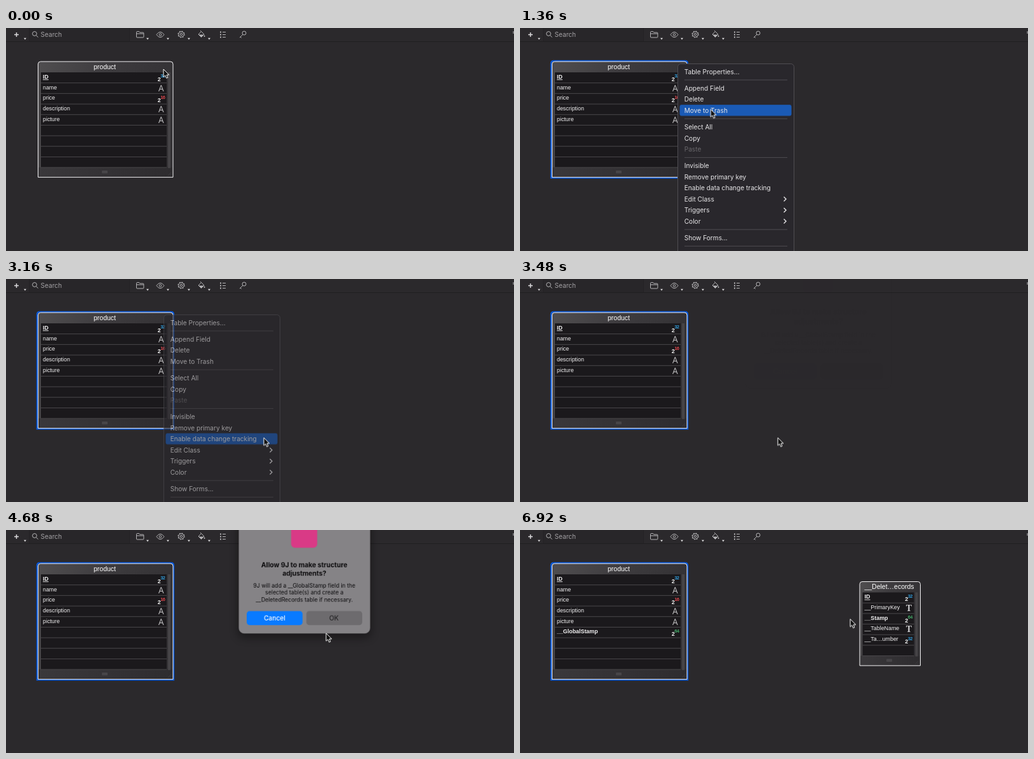
An HTML page for the animation above (8 s loop, 800 by 352 pixels).

```html
<!DOCTYPE html>
<html lang="en">
<head>
<meta charset="utf-8">
<title>Table structure editor</title>
<style>
  html, body { margin: 0; width: 100%; height: 100%; overflow: hidden; background: #2b292c; }
  svg { display: block; width: 800px; height: 352px; }
  text { white-space: pre; }
  .ui { font: 10.15px Inter, sans-serif; fill: #e8e7e9; }
  .mid { text-anchor: middle; }
  .head { font: 10.5px "Liberation Sans", Arial, sans-serif; fill: #fff; text-anchor: middle; }
  .field { font: 8.9px "Liberation Sans", Arial, sans-serif; fill: #f2f1f2; }
  .bold { font-weight: 700; }
  .two { font: 700 9px "Liberation Sans", Arial, sans-serif; fill: #eee; }
  .sup { font: 700 7.5px "Liberation Sans", Arial, sans-serif; letter-spacing: -.6px; }
  .alpha { font: 13.6px "Open Sans", sans-serif; fill: #bdbcbe; text-anchor: middle; }
  .serif { font: 700 14px "Liberation Serif", Times, serif; fill: #d4d3d5; text-anchor: middle; }
  .icon { fill: none; stroke: #b5b4b6; stroke-width: 1; }
  .ask { font: 700 10.4px Inter, sans-serif; fill: #0d0c0e; }
  .note { font: 8.78px Inter, sans-serif; fill: #0d0c0e; }

  .anim { animation: 8s linear infinite; }
  #cursor { animation-name: move; }
  #select { animation-name: select; animation-timing-function: step-end; }
  #menu { animation-name: menu; }
  #bar { animation-name: bar; animation-timing-function: step-end; }
  #dialog { animation-name: dialog; transform-origin: 469.8px 82px; }
  .added { animation-name: added; animation-timing-function: step-end; }

  @keyframes move {
    0%, .5% { transform: translate(248px, 65px); }
    2% { transform: translate(248px, 59px); }
    4%, 11% { transform: translate(247px, 55px); }
    14% { transform: translate(276px, 95px); }
    17% { transform: translate(300px, 128px); }
    19% { transform: translate(335px, 165px); }
    21% { transform: translate(385px, 220px); }
    22.5% { transform: translate(406px, 248px); }
    27.5%, 54.5% { transform: translate(406px, 250.5px); }
    56.5% { transform: translate(455px, 203px); }
    58.5% { transform: translate(504px, 163px); }
    60.5% { transform: translate(517px, 147px); }
    62.5%, 100% { transform: translate(520px, 140.5px); }
  }
  @keyframes select { 0% { opacity: 0; } 7.5%, 100% { opacity: 1; } }
  @keyframes menu {
    0%, 7.99% { opacity: 0; }
    8%, 37.5% { opacity: 1; }
    39.5% { opacity: .6; }
    42%, 100% { opacity: 0; }
  }
  @keyframes bar {
    0% { opacity: 0; transform: translateY(60.2px); }
    11.5% { opacity: 1; transform: translateY(60.2px); }
    13% { opacity: 0; transform: translateY(60.2px); }
    13.5% { opacity: 1; transform: translateY(86.2px); }
    14.8% { opacity: 1; transform: translateY(103.7px); }
    16.3% { opacity: 1; transform: translateY(121.2px); }
    17.5% { opacity: 0; transform: translateY(121.2px); }
    18% { opacity: 1; transform: translateY(147.2px); }
    19% { opacity: 1; transform: translateY(164.7px); }
    19.6% { opacity: 0; transform: translateY(164.7px); }
    20.6% { opacity: 1; transform: translateY(208.5px); }
    21.4% { opacity: 1; transform: translateY(226px); }
    22.3% { opacity: 1; transform: translateY(243.5px); }
    35.5% { opacity: 0; transform: translateY(243.5px); }
    36.5%, 100% { opacity: 1; transform: translateY(243.5px); }
  }
  @keyframes dialog {
    0%, 43.5% { opacity: 0; transform: scale(1.12); }
    45% { opacity: .87; transform: scale(1.053); }
    46% { opacity: 1; transform: scale(1.02); }
    47.5%, 83.5% { opacity: 1; transform: none; }
    85.5%, 100% { opacity: 0; transform: none; }
  }
  @keyframes added { 0% { opacity: 0; } 85%, 100% { opacity: 1; } }
</style>
</head>
<body>
<svg viewBox="0 0 800 352">
  <defs>
    <linearGradient id="shell" x2="1" y2=".3">
      <stop offset="0" stop-color="#504e50"/><stop offset=".5" stop-color="#3d3b3e"/><stop offset="1" stop-color="#333134"/>
    </linearGradient>
    <linearGradient id="foot" x2="1">
      <stop offset="0" stop-color="#3a383b"/><stop offset="1" stop-color="#2e2c2f"/>
    </linearGradient>
    <filter id="soft" x="-20%" y="-20%" width="140%" height="140%"><feGaussianBlur stdDeviation="7"/></filter>
  </defs>

  <rect width="800" height="352" fill="#2b292c"/>

  <g id="toolbar">
    <rect x="36" width="158" height="21" fill="#282629"/>
    <path d="M0 21.5H800" stroke="#201f21"/>
    <path d="M36.5 0V21M194.5 0V21" stroke="#242225"/>
    <path d="M16.5 7v7M13 10.5h7" stroke="#dddcde" stroke-width="1.5"/>
    <g class="icon">
      <circle cx="45" cy="9" r="3.4"/><path d="M47.5 11.5L50.5 14.7"/>
      <path d="M205.5 14V6.5q0-1 1-1h3l1.4 1.6h5q1 0 1 1V14q0 1-1 1h-9.4q-1 0-1-1zM205.5 9h11.4"/>
      <path d="M237 10.5q6-8.5 12 0q-6 8.5-12 0z"/><circle cx="243" cy="10.5" r="1.8"/>
      <circle cx="276" cy="10" r="4.2"/><circle cx="276" cy="10" r="1.7"/>
      <circle cx="276" cy="10" r="5" stroke-dasharray="1.9 2.03" stroke-width="1.2"/>
      <path d="M303 10l4.5-4.5 4.5 4.5-4.5 4.5zM306 4l2 2"/>
      <path d="M337 6.5h2M337 10.5h2M337 14.500h2" stroke-width="1.8"/>
      <path d="M341 6.500h5M341 10.500h5M341 14.500h5"/>
      <circle cx="375" cy="8" r="3"/><path d="M373 10.200l-5 5M369 14l1.700 1.700"/>
    </g>
    <path d="M303.500 10.500h8l-4 4zM312.500 11q2 3 0 3t0-3" fill="#b5b4b6"/>
    <path d="M799 5v4" stroke="#b5b4b6"/>
    <g id="carets" fill="#dddcde"></g>
    <text class="ui" x="54.500" y="14" style="fill:#a3a1a4">Search</text>
  </g>

  <g id="select" class="anim" fill="none" stroke="#0b58d6">
    <path d="M49 236.500V56q0-4 4-4H260q4 0 4 4V236.500z" stroke-width="2.400"/>
  </g>
  <g id="tables"></g>

  <g id="menu" class="anim">
    <rect x="248.500" y="56.500" width="183" height="320" rx="5" fill="#29272c" stroke="#504e53"/>
    <rect id="bar" class="anim" x="251.500" width="176" height="17.500" rx="3" fill="#1a5ab5"/>
    <g id="items"></g>
  </g>

  <g id="dialog" class="anim">
    <rect x="365" y="-40" width="210" height="210" rx="9" fill="#000" opacity=".4" filter="url(#soft)"/>
    <rect x="367" y="-40" width="206" height="203" rx="8" fill="#858386" stroke="#979598" stroke-width=".6"/>
    <rect x="449" y="-13" width="41" height="41" rx="6" fill="#d93a86"/>
    <g id="words" class="mid"></g>
    <rect x="379" y="128" width="88" height="22" rx="4.500" fill="#087aff"/>
    <rect x="473" y="128" width="88" height="22" rx="4.500" fill="#6d6b6e"/>
    <text class="ui mid" x="423" y="142.500" style="fill:#fff;font-weight:500">Cancel</text>
    <text class="ui mid" x="516.500" y="142.500" style="fill:#252426;font-weight:500">OK</text>
  </g>

  <g id="cursor" class="anim">
    <path d="M0 0V12.300L2.800 9.800L4.700 14.200L6.900 13.200L5 9H8.800Z" fill="#111" stroke="#fff" stroke-width="1" stroke-linejoin="round"/>
  </g>
</svg>
<script>
  const PITCH = 16.68;
  const SUP = { 32: '#2f97d3', 16: '#d8454b', 64: '#43a767' };
  const put = (id, html) => document.getElementById(id).innerHTML += html;
  const text = (cls, x, y, s, extra = '') => `<text class="${cls}" x="${x}" y="${y}" ${extra}>${s}</text>`;

  function typeIcon(type, right, top) {
    if (type === 'A') return text('alpha', right - 18.8, top + 13.4, 'A');
    if (type === 'T') return text('serif', right - 18, top + 12.8, 'T');
    return text('two', right - 24.2, top + 13.7, '2') +
      text('sup', right - 19.8, top + 8.4, type, `fill="${SUP[type]}"`);
  }

  function table(x, y, w, title, rows, fields) {
    const top = y + 17, right = x + w, end = top + rows * PITCH, bottom = end + 16;
    const mid = x + w / 2 - 1;
    let s = `<path d="M${x + .5} ${bottom - .5}V${y + 4}q0-4 4-4H${right - 4}q4 0 4 4V${bottom - .5}z" fill="url(#shell)"/>
      <rect x="${x + 1}" y="${end}" width="${w - 1}" height="15" fill="url(#foot)"/>
      <rect x="${x + 5}" y="${top}" width="${w - 15}" height="${rows * PITCH}" fill="#1b191c"/>
      <rect x="${right - 8}" y="${top}" width="4" height="${rows * PITCH + 1}" fill="#464447"/>
      <rect x="${mid - 4.5}" y="${end + 5}" width="9" height="4.5" rx="1" fill="#474548"/>
      <path d="M${right - 8} ${bottom - 3}l5-5M${right - 5} ${bottom - 3}l2-2" stroke="#444245" stroke-width=".7"/>`;
    for (let i = 1; i <= rows; i++)
      s += `<path d="M${x + 5} ${top + i * PITCH}h${w - 15}" stroke="#4a484b"/>`;
    fields.forEach(([name, type, cls = ''], i) => {
      const row = top + i * PITCH;
      const line = i ? '' : `<path d="M${x + 8} ${row + 11.6}h9" stroke="#f2f1f2" stroke-width=".9"/>`;
      s += `<g class="${cls.includes('added') ? 'anim added' : ''}">` +
        text(`field ${i === 0 || cls.includes('bold') ? 'bold' : ''}`, x + 8, row + 9.9, name) +
        line + typeIcon(type, right, row) + '</g>';
    });
    s += `<path d="M${x + .5} ${bottom - .5}V${y + 4}q0-4 4-4H${right - 4}q4 0 4 4V${bottom - .5}z" fill="none" stroke="#f4f3f5"/>`;
    return s + text('head', mid, y + 11.6, title);
  }

  put('carets', [30, 223, 255, 288, 320].map(x => `<path d="M${x - 2} 15.800h4l-2 2.700z"/>`).join(''));

  put('tables', table(50, 53, 213, 'product', 9, [
    ['ID', 32], ['name', 'A'], ['price', 16], ['description', 'A'], ['picture', 'A'],
    ['__GlobalStamp', 64, 'bold added']
  ]) + '<g class="anim added">' + table(534.5, 81.5, 96, '__Delet…ecords', 6, [
    ['ID', 32], ['__PrimaryKey', 'T'], ['__Stamp', 64, 'bold'], ['__TableName', 'T'], ['__Ta…umber', 32]
  ]) + '</g>');

  // Blank entries are separators.
  const items = ['Table Properties...', '', 'Append Field', 'Delete', 'Move to Trash', '',
    'Select All', 'Copy', 'Paste', '', 'Invisible', 'Remove primary key',
    'Enable data change tracking', 'Edit Class', 'Triggers', 'Color', '', 'Show Forms...', ''];
  let y = 69;
  items.forEach(name => {
    if (!name) {
      put('items', `<path d="M259 ${y - 4.5}H421" stroke="#4f4d52"/>`);
      y += 8.7;
      return;
    }
    put('items', text('ui', 258.7, y + 3.7, name, name === 'Paste' ? 'style="fill:#69676b"' : ''));
    if (/^(Edit|Trig|Color)/.test(name))
      put('items', `<path d="M415.500 ${y - 3.5}l3.500 3.500l-3.500 3.500" fill="none" stroke="#e8e7e9" stroke-width="1.400"/>`);
    y += 17.5;
  });

  [['ask', 59, 'Allow 9J to make structure'], ['ask', 72, 'adjustments?'],
   ['note', 90.5, '9J will add a __GlobalStamp field in the'],
   ['note', 102, 'selected table(s) and create a'],
   ['note', 113.3, '__DeletedRecords table if necessary.']]
    .forEach(([cls, y, s]) => put('words', text(cls, 469.8, y, s)));
</script>
</body>
</html>
```
